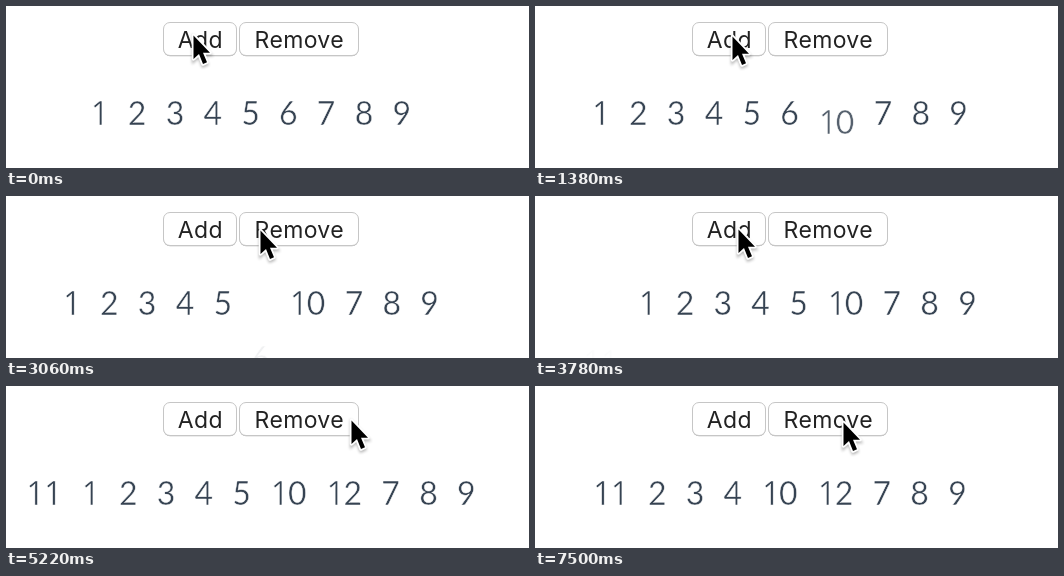
An HTML page for the animation above (7.68 s loop, 523x162 px).

```html
<!DOCTYPE html>
<html lang="en">
<head>
<meta charset="utf-8">
<title>List transition</title>
<style>
  html, body { margin: 0; width: 100%; height: 100%; overflow: hidden; background: #fff; }
  svg { display: block; width: 523px; height: 162px; }
  .label { font: 400 23px Inter, Roboto, sans-serif; letter-spacing: 0.35px; text-anchor: middle; }
  /* The thin white outline lightens the strokes. */
  .digit { font: 400 32px Lato, "Open Sans", sans-serif; text-anchor: middle; fill: #364352; stroke: #fff; stroke-width: 0.5px; }
  .one { font-family: "Open Sans", "Noto Sans", sans-serif; }
</style>
</head>
<body>
<svg id="stage" viewBox="0 0 523 162">
  <defs>
    <linearGradient id="blue" x2="0" y2="1">
      <stop offset="0" stop-color="#6db3fb"/>
      <stop offset="1" stop-color="#1470f5"/>
    </linearGradient>
    <filter id="soft" x="-50%" y="-50%" width="200%" height="200%">
      <feGaussianBlur stdDeviation="1.4"/>
    </filter>
  </defs>
</svg>
<script>
const LOOP = 7680, STEP = 60, FADE = 900, DROP = 60;
const CENTER = 254.5, DIGIT = 17.8, GAP = 20, BASELINE = 118.5;
const ARROW = 'M0.5 3.5V27L6 22L10 32L14 30.2L10 20.8H17Z';

// Order in the row; start and end mark when an item is added or removed.
const items = [
  { n: 11, start: 3760 }, { n: 1, end: 6130 }, { n: 2 }, { n: 3 }, { n: 4 },
  { n: 5, end: 5685 }, { n: 6, end: 2447 }, { n: 10, start: 890 },
  { n: 12, start: 4105 }, { n: 7 }, { n: 8 }, { n: 9 }
];

const buttons = [
  { text: 'Add', x: 157.5, w: 73, presses: [[760, 890], [3600, 3760], [3960, 4105]] },
  { text: 'Remove', x: 233.5, w: 119, presses: [[2400, 2445], [5560, 5685], [6000, 6100]] }
];

// Pointer path: time, x, y
const path = [
  [0, 187, 26], [60, 180, 28], [540, 180, 28], [720, 197, 27], [1800, 197, 27],
  [2040, 192, 28], [2280, 192, 28], [2400, 254, 31], [3060, 254, 31], [3360, 203, 30],
  [4500, 203, 30], [5100, 167, 31], [5160, 260, 66], [5220, 345, 31], [5340, 345, 31],
  [5520, 306, 33], [6180, 306, 33], [6300, 306, 28], [6480, 305, 34], [7440, 305, 34],
  [7500, 308, 33], [LOOP, 308, 33]
];

const stage = document.getElementById('stage');

function add(parent, tag, attrs, text) {
  const el = document.createElementNS('http://www.w3.org/2000/svg', tag);
  set(el, attrs);
  if (text !== undefined) el.textContent = text;
  return parent.appendChild(el);
}

function set(el, attrs) {
  for (const key in attrs) el.setAttribute(key, attrs[key]);
}

// CSS "ease": cubic-bezier(.25, .1, .25, 1)
function ease(p) {
  if (p <= 0) return 0;
  if (p >= 1) return 1;
  const curve = (s, a, b) => 3 * s * (1 - s) * (1 - s) * a + 3 * s * s * (1 - s) * b + s * s * s;
  let lo = 0, hi = 1;
  for (let i = 0; i < 24; i++) {
    const mid = (lo + hi) / 2;
    if (curve(mid, 0.25, 0.25) < p) lo = mid; else hi = mid;
  }
  return curve(lo, 0.1, 1);
}

for (const b of buttons) {
  b.shade = add(stage, 'rect', { x: b.x, y: 17.2, width: b.w, height: 33, rx: 6.5, fill: '#b4b4b4' });
  b.face = add(stage, 'rect', { x: b.x, y: 16.5, width: b.w, height: 33, rx: 6.5 });
  b.label = add(stage, 'text', { class: 'label', x: b.x + b.w / 2 + 0.3, y: 42 }, b.text);
}

for (const item of items) {
  const chars = String(item.n);
  item.width = chars.length * DIGIT + GAP;
  item.el = add(stage, 'g', {});
  [...chars].forEach((c, i) => {
    const one = c === '1';
    add(item.el, 'text', {
      class: one ? 'digit one' : 'digit',
      x: (i + 0.5) * DIGIT + (one ? 0.6 : 0),
      y: 0
    }, c);
  });
}

const pointer = add(stage, 'g', {});
add(pointer, 'path', { d: ARROW, transform: 'translate(0 2)', fill: '#000', stroke: '#000',
  'stroke-width': 3, opacity: 0.3, filter: 'url(#soft)' });
add(pointer, 'path', { d: ARROW, fill: '#000', stroke: '#fff', 'stroke-width': 3.6,
  'stroke-linejoin': 'round', 'paint-order': 'stroke' });

function drawButtons(t) {
  for (const b of buttons) {
    const down = b.presses.some(([from, to]) => t >= from && t < to);
    set(b.face, { fill: down ? 'url(#blue)' : '#fff', stroke: down ? '#2a74e0' : '#c6c6c6' });
    set(b.label, { fill: down ? '#fff' : '#222' });
  }
}

function drawItems(t) {
  const shown = items.filter(({ start = 0, end = LOOP }) => t >= start && t < end + FADE);
  let x = CENTER - shown.reduce((sum, item) => sum + item.width, 0) / 2;
  for (const item of items) {
    const visible = shown.includes(item);
    set(item.el, { display: visible ? 'inline' : 'none' });
    if (!visible) continue;
    const entered = item.start === undefined ? 1 : ease((t - item.start) / FADE);
    const left = item.end === undefined ? 0 : ease((t - item.end) / FADE);
    const alpha = entered - left;
    set(item.el, { transform: `translate(${x} ${BASELINE + DROP * (1 - alpha)})`, opacity: alpha });
    x += item.width;
  }
}

function drawPointer(t) {
  const i = path.findIndex(p => p[0] > t);
  const [t0, x0, y0] = path[i - 1], [t1, x1, y1] = path[i];
  const k = (t - t0) / (t1 - t0);
  set(pointer, { transform: `translate(${x0 + (x1 - x0) * k} ${y0 + (y1 - y0) * k})` });
}

function draw(ms) {
  const t = Math.floor((ms % LOOP) / STEP) * STEP;
  drawButtons(t);
  drawItems(t);
  drawPointer(t);
}

const began = performance.now();
function tick() {
  draw(performance.now() - began);
  requestAnimationFrame(tick);
}
tick();
</script>
</body>
</html>
```
